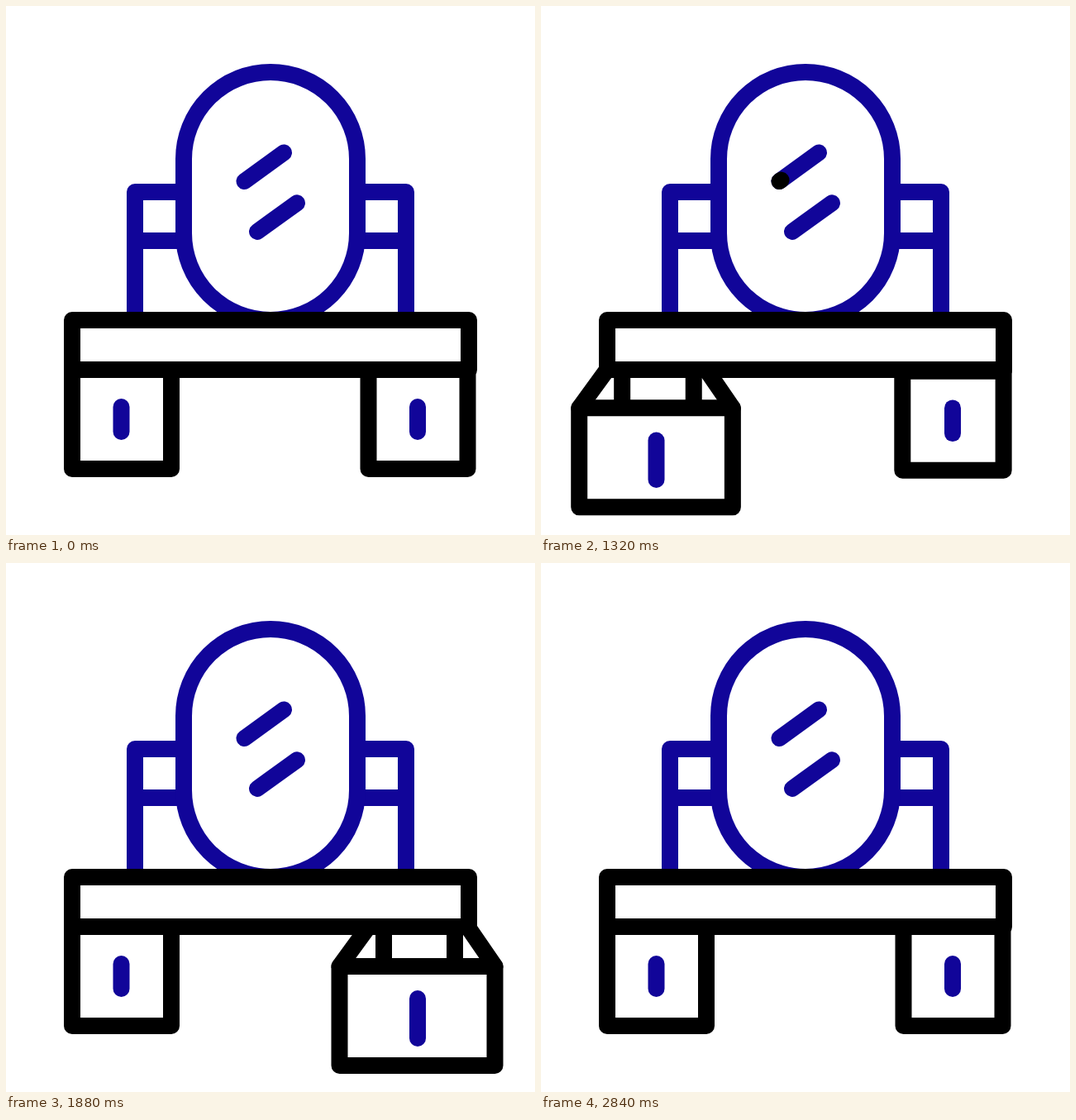
These frames come from a looping animation (640x640 px, 3 s). An HTML page without scripts:

```html
<!DOCTYPE html>
<html lang="en">
<head>
<meta charset="utf-8">
<title>Dressing table</title>
<style>
  @property --t { syntax: "<number>"; inherits: true; initial-value: 0; }
  @property --head { syntax: "<number>"; inherits: true; initial-value: 0; }
  @property --tail { syntax: "<number>"; inherits: true; initial-value: 0; }

  html, body { margin: 0; width: 100%; height: 100%; overflow: hidden; background: #fff; }
  svg { display: block; width: 100vw; height: 100vh; }

  .blue, .black { fill: none; stroke-width: 20; stroke-linejoin: round; }
  .blue { stroke: #110599; }
  .black { stroke: #000; }
  .round { stroke-linecap: round; }
  .solid { fill: #fff; }

  /* --p is the eased opening of a drawer, 0 closed to 1 open */
  .drawer {
    --p: calc(var(--t) * var(--t) * (3 - 2 * var(--t)));
    animation: 3s -1ms infinite;
  }
  .left { animation-name: left; }
  .right { animation-name: right; }

  .side { stroke-dasharray: calc(var(--p) * 1px) 2px; }
  .rail { y: 440px; width: 20px; height: calc(48px * var(--p)); }
  .rail-a { x: calc(79px + 9.5px * var(--p)); }
  .rail-b { x: calc(181.5px - 7px * var(--p)); }
  .front {
    x: calc(80px - 35px * var(--p));
    y: calc(440px + 48px * var(--p));
    width: calc(120px + 68px * var(--p));
    height: 120px;
  }
  .handle {
    fill: #110599;
    x: 129.5px;
    y: calc(475px + 42px * var(--p));
    width: 20px;
    height: calc(50px + 18px * var(--p));
    rx: 10px;
  }

  /* a black stroke runs along each glint: head leads, tail follows */
  .sweep {
    --a: calc(var(--tail) * var(--tail) * (3 - 2 * var(--tail)));
    --b: calc(var(--head) * var(--head) * (3 - 2 * var(--head)));
    --len: calc(var(--b) - var(--a));
    stroke-dasharray: calc(var(--len) * 1px) 2px;
    stroke-dashoffset: calc(var(--a) * -1px);
    opacity: calc(var(--len) * 1000);
    animation: head 3s -1ms infinite, tail 3s -1ms infinite;
  }
  .late { animation-delay: -2921ms; }

  @keyframes left {
    0% { --t: 0; }
    4% { --t: 0; animation-timing-function: steps(9); }
    16% { --t: 1; }
    42.6666% { --t: 1; animation-timing-function: steps(9); }
    54.6666%, 100% { --t: 0; }
  }
  @keyframes right {
    0% { --t: 0; }
    42.6666% { --t: 0; animation-timing-function: steps(9); }
    54.6666% { --t: 1; }
    82.6666% { --t: 1; animation-timing-function: steps(9); }
    94.6666%, 100% { --t: 0; }
  }
  @keyframes head {
    0% { --head: 0; }
    42.6666% { --head: 0; animation-timing-function: steps(8); }
    53.3333%, 100% { --head: 1; }
  }
  @keyframes tail {
    0% { --tail: 0; }
    49.3333% { --tail: 0; animation-timing-function: steps(8); }
    60%, 100% { --tail: 1; }
  }
</style>
</head>
<body>
<svg viewBox="0 0 640 640">
  <defs>
    <g id="drawer">
      <path class="black round side" pathLength="1" d="M80 440L45 488"/>
      <path class="black round side" pathLength="1" d="M200 440L233 488"/>
      <rect class="rail rail-a"/>
      <rect class="rail rail-b"/>
      <rect class="black solid front"/>
      <rect class="handle"/>
    </g>
  </defs>

  <g class="blue">
    <path d="M156 375V225H215M156 284H215"/>
    <path d="M484 375V225H425M484 284H425"/>
    <rect class="solid" x="215" y="80" width="210" height="300" rx="105"/>
    <path class="round" d="M288.5 212L336 177.5M304 273L352 238.3"/>
  </g>
  <path class="black round sweep" pathLength="1" d="M288.5 212L336 177.5"/>
  <path class="black round sweep late" pathLength="1" d="M304 273L352 238.3"/>

  <use class="drawer left" href="#drawer"/>
  <use class="drawer right" href="#drawer" x="358.5"/>
  <rect class="black solid" x="80" y="380" width="480" height="60"/>
</svg>
</body>
</html>
```
